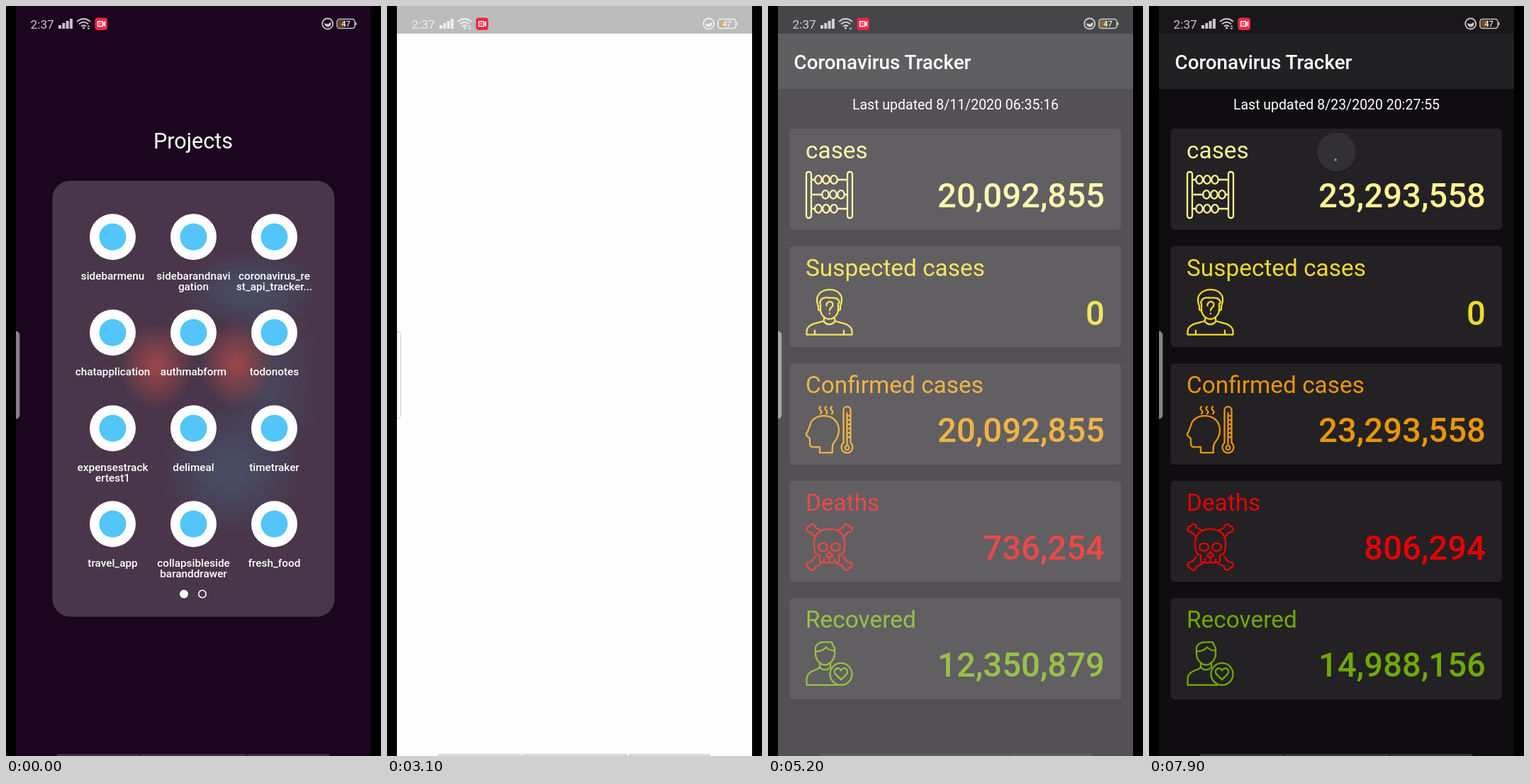
Write an HTML page that moves like this. It is 529 px wide and 1058 px high and loops after 8000 ms.

```html
<!DOCTYPE html>
<html lang="en">
<head>
<meta charset="utf-8">
<title>Tracker app launch</title>
<style>
html, body { margin: 0; width: 100%; height: 100%; overflow: hidden; background: #000; }
svg, #splash { position: absolute; left: 0; top: 0; }
svg { width: 529px; height: 1058px; font-family: Roboto, sans-serif; }

/* One loop is 8 s; 1.25 % is one 100 ms step. */
.anim { animation: 8s step-end -20ms infinite; }
#splash { box-sizing: border-box; background: #fefdfe; border-top: 0 solid #000; animation-name: launch; }
#ring { animation-name: ring; }
#app { animation-name: fade; }
#icons { animation-name: icons; }
.before { animation-name: before; }
.after { animation-name: after; }
#pull { animation-name: pull; }
#spin { animation-name: spin; }
#up { animation-name: up; }
#down { animation-name: down; }

@keyframes launch {
  0% { visibility: hidden; }
  27.5% { visibility: visible; left: 85px; top: 103px; width: 408px; height: 700px; border-top-width: 32px; border-radius: 33px; }
  28.75% { visibility: visible; left: 32px; top: 24px; width: 478px; height: 960px; border-top-width: 37px; border-radius: 22px; }
  30% { border-top-color: #000; }
  36.25% { border-top-color: #3f3f3f; }
  37.5% { border-top-color: #888; }
  38.75% { border-top-color: #bcbcbc; }
  30%, 36.25%, 37.5%, 38.75%, 100% { visibility: visible; left: 14px; top: 0; width: 501px; height: 1058px; border-top-width: 39px; border-radius: 0; }
  100% { border-top-color: #bcbcbc; }
}
@keyframes ring { 0%, 28.75%, 100% { opacity: 0; } 27.5% { opacity: 1; } }
@keyframes fade {
  0% { opacity: 0; } 61.25% { opacity: .03; } 62.5% { opacity: .18; } 63.75% { opacity: .44; }
  65% { opacity: .72; } 66.25% { opacity: .92; } 67.5%, 100% { opacity: 1; }
}
@keyframes icons { 0% { opacity: 0; } 65%, 100% { opacity: 1; } }
@keyframes before { 0% { opacity: 1; } 95%, 100% { opacity: 0; } }
@keyframes after { 0% { opacity: 0; } 95%, 100% { opacity: 1; } }
@keyframes pull {
  0% { transform: translate(264.5px, 80px); } 85% { transform: translate(264.5px, 105px); }
  86.25% { transform: translate(264.5px, 140px); } 87.5% { transform: translate(264.5px, 185px); }
  88.75% { transform: translate(264.5px, 225px); } 90% { transform: translate(264.5px, 238px); }
  91.25% { transform: translate(264.5px, 220px); } 92.5%, 100% { transform: translate(264.5px, 206px); }
}
@keyframes spin {
  0% { stroke-dasharray: 5 100; transform: rotate(-90deg); }
  86.25% { stroke-dasharray: 20 100; transform: rotate(-90deg); }
  87.5% { stroke-dasharray: 45 100; transform: rotate(-85deg); }
  88.75% { stroke-dasharray: 65 100; transform: rotate(-80deg); }
  90% { stroke-dasharray: 75 100; transform: rotate(-75deg); }
  91.25% { stroke-dasharray: 60 100; transform: rotate(-60deg); }
  92.5% { stroke-dasharray: 40 100; transform: rotate(-20deg); }
  93.75% { stroke-dasharray: 25 100; transform: rotate(15deg); }
  95% { stroke-dasharray: 14 100; transform: rotate(45deg); }
  96.25% { stroke-dasharray: 8 100; transform: rotate(65deg); }
  97.5% { stroke-dasharray: 3.5 100; transform: rotate(82deg); }
  98.75%, 100% { stroke-dasharray: 4 100; transform: rotate(90deg); }
}
@keyframes up { 0%, 30%, 67.5%, 100% { opacity: 1; } 23.75%, 50% { opacity: 0; } }
@keyframes down { 0%, 30%, 100% { opacity: 1; } 23.75% { opacity: 0; } }
</style>
</head>
<body>
<svg viewBox="0 0 529 1058" text-anchor="middle" fill="#fff">
  <defs>
    <radialGradient id="red"><stop offset=".1" stop-color="#97454a"/><stop offset=".55" stop-color="#8c4349" stop-opacity=".6"/><stop offset="1" stop-color="#8c4349" stop-opacity="0"/></radialGradient>
    <radialGradient id="blue"><stop offset=".2" stop-color="#474c63"/><stop offset="1" stop-color="#474c63" stop-opacity="0"/></radialGradient>
  </defs>
  <rect x="14" width="501" height="1058" fill="#1b051f"/>
  <text x="264" y="201" font-size="30.6">Projects</text>
  <rect x="65.5" y="246.500" width="398" height="615" rx="25" fill="#49364a"/>
  <g fill="url(#blue)">
    <ellipse cx="345" cy="400" rx="100" ry="55"/>
    <ellipse cx="370" cy="530" rx="75" ry="130" opacity=".6"/>
    <ellipse cx="318" cy="655" rx="100" ry="90"/>
  </g>
  <g fill="url(#red)">
    <ellipse cx="212" cy="508" rx="52" ry="60"/>
    <ellipse cx="325" cy="505" rx="52" ry="60"/>
  </g>
  <g id="launcher" font-size="15.3" font-weight="500"></g>
  <circle cx="251" cy="829.500" r="6"/>
  <circle cx="277" cy="829.500" r="5.200" fill="none" stroke="#fff" stroke-width="1.600"/>
</svg>

<div id="splash" class="anim"></div>

<svg viewBox="0 0 529 1058">
  <clipPath id="list"><rect x="14" y="117" width="501" height="941"/></clipPath>
  <circle id="ring" class="anim" cx="376" cy="354" r="15.700" fill="none" stroke="#dbe1e5" stroke-width="2.300"/>
  <g id="app" class="anim">
    <rect x="14" width="501" height="1058" fill="#100d11"/>
    <rect x="14" width="501" height="117" fill="#212023"/>
    <rect x="14" width="501" height="39" fill="#19171a"/>
    <text x="36.500" y="89" font-size="27.8" font-weight="500" fill="#fff">Coronavirus Tracker</text>
    <g font-size="19.5" text-anchor="middle" fill="#fff">
      <text class="anim before" x="264.500" y="146">Last updated 8/11/2020 06:35:16</text>
      <text class="anim after" x="264.500" y="146">Last updated 8/23/2020 20:27:55</text>
    </g>
    <g id="cards"></g>
    <g id="icons" class="anim" fill="none" stroke-width="2.300" stroke-linecap="round" stroke-linejoin="round">
      <g id="abacus"></g>
      <g id="suspect">
        <path d="M18 25C11 8 24 1.500 34 1.500S56 8 49 25M18 25V29Q18 31 21 31M49 25V29Q49 31 46 31M20 20C23 11 28 13 34 13S46 12 48 20M21 21V29C21 38 28 43 33.500 43S46 38 46 29V21M26 40V45C24 49 1.500 47 1.500 61V65H65.500V61C65.500 47 43 49 41 45V40M13 59V65M54 59V65M26 47Q33.500 54 41 47"/>
        <path d="M29.500 24C29 17 39 17 38.500 23C38.500 27 34 26 34 31M34 35V35.500"/>
      </g>
      <g id="fever">
        <path d="M20 66V58H11Q6 58 6 53V46L1.500 42Q0 39 3 36L6 28C8 18 17 14 26 14C40 14 47 24 47 34C47 44 42 49 39 53Q37 58 38 66Z"/>
        <path d="M21 1Q18 3 21 6T21 11M29 1Q26 3 29 6T29 11M37 1Q34 3 37 6T37 11"/>
        <path d="M53.500 52V6A5 5 0 0 1 63.500 6V52A8 8 0 1 1 53.500 52ZM58.500 10V54M58.500 56A3 3 0 1 0 58.600 56M60 14H63M60 20H63M60 26H63M60 32H63M60 38H63M60 44H63"/>
      </g>
      <g id="skull">
        <path d="M13 38C8 16 20 8 33.500 8S59 16 54 38Q54 44 47 45V54Q44 57 41 54Q38 58 33.500 54Q29 58 26 54Q23 57 20 54V45Q13 44 13 38ZM26 54V50M33.500 54V50M41 54V50M33.500 40L29 46Q33.500 50 38 46Z"/>
        <ellipse cx="24.500" cy="33.500" rx="6.500" ry="5.500"/><ellipse cx="42.500" cy="33.500" rx="6.500" ry="5.500"/>
        <path id="bone" d="M22 10L14 6C14 1 8-1 6 4C1 4 0 10 4 12C7 13 9 12 11 17L14 20"/>
        <use href="#bone" transform="matrix(-1 0 0 1 67 0)"/>
        <use href="#bone" transform="matrix(1 0 0 -1 0 67)"/>
        <use href="#bone" transform="matrix(-1 0 0 -1 67 67)"/>
      </g>
      <g id="healed">
        <path d="M14 15C12 6 19 2 27 2H37Q39 8 41 10V18C41 27 34 34 27.500 34S14 27 14 18ZM14 15Q24 15 29 9Q33 14 41 14M20 32V37C18 43 1.500 40 1.500 55V62.500H44M20 38Q27 44 35 38V32"/>
        <circle cx="50" cy="47" r="15.500"/>
        <path d="M50 55L42 47C38 41 46 35 50 42C54 35 62 41 58 47Z"/>
      </g>
    </g>
    <g clip-path="url(#list)">
      <g id="pull" class="anim">
        <circle cy="1" r="28.500" opacity=".2"/>
        <circle r="27.600" fill="#323033"/>
        <circle id="spin" class="anim" r="11.100" pathLength="100" fill="none" stroke="#5fdbd8" stroke-width="2.800"/>
      </g>
    </g>
  </g>
</svg>

<svg viewBox="0 0 529 1058">
  <path d="M72 1055H189V1058H72ZM190.500 1055H339V1058H190.500ZM340.500 1055H456V1058H340.500Z" fill="#888" opacity=".3"/>
  <path d="M14 458.500Q19.300 459 19.300 465V576Q19.300 582 14 582.500Z" fill="#fff" fill-opacity=".5" stroke="#555" stroke-opacity=".3"/>
  <g fill="#fff" opacity=".76">
    <text x="34.500" y="31.500" font-size="17.300">2:37</text>
    <path d="M74 27H78V32H74ZM79.300 24H83.300V32H79.300ZM84.600 21H88.600V32H84.600ZM89.900 18H93.900V32H89.900Z"/>
    <path d="M100 22Q109.500 14 119 22M103 25.500Q109.500 20 116 25.500M106 28.700Q109.500 26 113 28.700" fill="none" stroke="#fff" stroke-width="2"/>
    <circle cx="109.500" cy="31" r="1.600"/>
    <path id="up" class="anim" d="M114.500 29.500L116.500 27L118.500 29.500Z"/>
    <path id="down" class="anim" d="M114.500 31L116.500 33.500L118.500 31Z"/>
    <circle cx="453.700" cy="25" r="7.500" fill="none" stroke="#fff" stroke-width="1.800"/>
    <path d="M449 24Q454 27 458.500 22.500Q459.500 29 454 29.700Q449.500 29.500 449 24Z"/>
    <rect x="467" y="18.500" width="25" height="13" rx="3.500" fill="none" stroke="#fff" stroke-width="1.500"/>
    <path d="M493 23H494.500V27H493Z"/>
  </g>
  <rect x="468.500" y="20" width="10.500" height="10" rx="2" fill="#d9a429" opacity=".4"/>
  <text x="479.500" y="29" font-size="11" font-weight="500" text-anchor="middle" fill="#fff" opacity=".9">47</text>
  <rect x="125.500" y="16.500" width="17.500" height="17.500" rx="4" fill="#ef2745"/>
  <path d="M129.500 22H136.500V28.500H129.500ZM137 25L139.500 22.500V28L137 25.500M131.500 25.200H134.500" fill="none" stroke="#fff" stroke-width="1.300"/>
  <path d="M0 0H14V1058H0ZM515 0H529V1058H515Z"/>
</svg>

<script>
const byId = id => document.getElementById(id);

const apps = [
  'sidebarmenu', 'sidebarandnavi|gation', 'coronavirus_re|st_api_tracker...',
  'chatapplication', 'authmabform', 'todonotes',
  'expensestrack|ertest1', 'delimeal', 'timetraker',
  'travel_app', 'collapsibleside|baranddrawer', 'fresh_food'
];
byId('launcher').innerHTML = apps.map((name, i) => {
  const x = 150.5 + i % 3 * 114, y = 325.7 + Math.floor(i / 3) * 135;
  const lines = name.split('|').map((line, n) => `<text x="${x}" y="${y + 60.3 + n * 15}">${line}</text>`);
  return `<circle cx="${x}" cy="${y}" r="32.5"/><circle cx="${x}" cy="${y}" r="19" fill="#54c5f8"/>${lines.join('')}`;
}).join('');

const cards = [
  ['cases', 'abacus', '#fff492', '20,092,855', '23,293,558'],
  ['Suspected cases', 'suspect', '#eeda28', '0', '0'],
  ['Confirmed cases', 'fever', '#e99600', '20,092,855', '23,293,558'],
  ['Deaths', 'skull', '#e40000', '736,254', '806,294'],
  ['Recovered', 'healed', '#70a901', '12,350,879', '14,988,156']
];
byId('cards').innerHTML = cards.map(([label, icon, color, before, after], i) => {
  const y = 173 + i * 165.6;
  byId(icon).setAttribute('transform', `translate(53 ${y + 60})`);
  byId(icon).setAttribute('stroke', color);
  const count = (value, phase) =>
    `<text class="anim ${phase}" x="475" y="${y + 111}" font-size="47.3" font-weight="500" text-anchor="end">${value}</text>`;
  return `<g fill="${color}">
    <rect x="30.5" y="${y + 1}" width="467.5" height="144" rx="5.5" fill="#0a090b"/>
    <rect x="30.5" y="${y}" width="467.5" height="143" rx="5.5" fill="#232124"/>
    <text x="53" y="${y + 42}" font-size="33.4">${label}</text>
    ${count(before, 'before')}${count(after, 'after')}</g>`;
}).join('');

// Each rod holds three beads, pushed left or right.
const rods = [[12, 18], [33, 28], [53, 18]].map(([y, x]) =>
  `<path d="M8 ${y}H${x - 5}M${x + 27} ${y}H59"/>` +
  [0, 11, 22].map(dx => `<ellipse cx="${x + dx}" cy="${y}" rx="4.8" ry="5.8"/>`).join(''));
byId('abacus').innerHTML = '<rect x="1" y="1" width="7" height="65" rx="3"/><rect x="59" y="1" width="7" height="65" rx="3"/>' + rods.join('');
</script>
</body>
</html>
```
